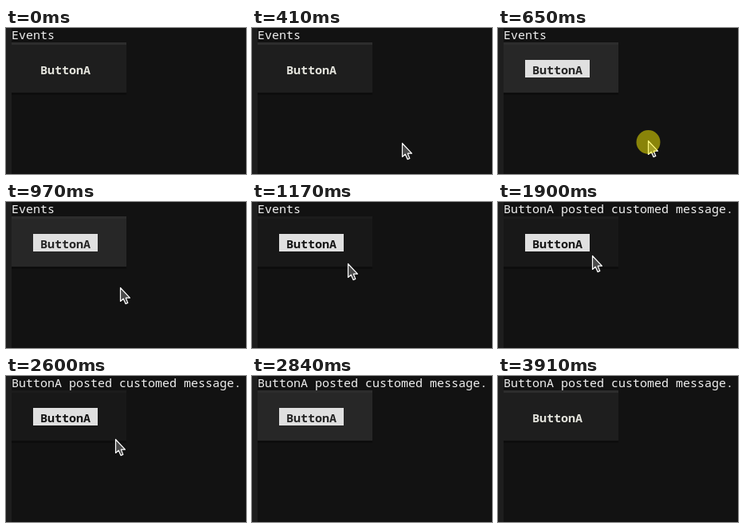
Write an HTML page that moves like this. It is 301 px wide and 183 px high and loops after 3990 ms.

```html
<!DOCTYPE html>
<html lang="en">
<head>
<meta charset="utf-8">
<title>Custom message</title>
<style>
  html, body { margin: 0; width: 100%; height: 100%; overflow: hidden; background: #121212; }
  svg { display: block; width: 301px; height: 183px; }
  text { font: 15px "Noto Sans Mono", "DejaVu Sans Mono", monospace; fill: #f0f0f0; white-space: pre; }
  rect { shape-rendering: crispEdges; }
  .edge { fill: #1e1e1e; }

  #button { --face: #1e1e1e; --top: #2d2d2d; --bottom: #0d0d0d; }
  #button.focus { --face: #272727; --top: #2d2d2d; }
  #button.hover { --face: #181818; --top: #1c1c1c; }
  #button.active { --face: #161616; --top: #101010; --bottom: #242424; }
  .face { fill: var(--face); }
  .top { fill: var(--top); }
  .bottom { fill: var(--bottom); }
  .label { fill: none; }
  #button text { font-weight: 700; fill: #e3e3dc; }
  .focus .label { fill: #e0e0e0; }
  #button.focus text { fill: #242424; }
  #button.hover text { fill: #151515; }
  .active .label { fill: #a2a2a2; }

  .arrow { fill: #4b4b4b; stroke: #fff; stroke-width: 1.2; stroke-linejoin: round; }
  #ring { fill: #fff500; fill-opacity: .5; }
</style>
</head>
<body>
<svg viewBox="0 0 301 183">
  <rect class="edge" width="7" height="183"/>
  <text id="title" x="7" y="14">Events</text>
  <g id="button">
    <rect class="face" x="7" y="18" width="144" height="66"/>
    <rect class="top" x="7" y="18" width="144" height="3"/>
    <rect class="bottom" x="7" y="81" width="144" height="3"/>
    <rect class="label" x="34" y="40" width="81" height="22"/>
    <text x="43" y="58">ButtonA</text>
  </g>
  <g id="pointer">
    <path class="arrow" d="M.5 .5V17.5L4.2 14.2L7 20.6L9.8 19.4L7.3 13.2H12.4Z"/>
    <circle id="ring" cx=".5" cy="2" r="15"/>
  </g>
</svg>
<script>
  const LOOP = 3990, TICK = 40;
  const [title, button, pointer, ring] =
    ["title", "button", "pointer", "ring"].map(id => document.getElementById(id));

  const easeOut = n => p => 1 - (1 - p) ** n;
  const easeIn = n => p => p ** n;

  // Each move advances once per tick, starting with its first step at `start`.
  const moves = [
    { start: 250, steps: 6, from: [183, 186], to: [188, 141], x: easeOut(1.5), y: easeOut(1.5) },
    { start: 810, steps: 12, from: [188, 141], to: [118, 67], x: easeOut(1.9), y: easeOut(1.14) },
    { start: 2600, steps: 7, from: [118, 67], to: [318, 188], x: easeIn(1.2), y: easeIn(1.2) }
  ];

  const within = (t, a, b) => t >= a && t < b;

  function locate(t) {
    const move = moves.findLast(m => t >= m.start);
    if (!move) return null;
    const { start, steps, from, to } = move;
    const p = Math.min(steps, Math.floor((t - start) / TICK) + 1) / steps;
    const mix = (i, ease) => Math.round(from[i] + (to[i] - from[i]) * ease(p));
    return [mix(0, move.x), mix(1, move.y)];
  }

  function draw(t) {
    const spot = locate(t);
    const over = !!spot && within(spot[0], 7, 151) && within(spot[1], 18, 84);

    pointer.style.display = spot ? "" : "none";
    if (spot) pointer.setAttribute("transform", `translate(${spot})`);
    ring.style.display = within(t, 610, 730) || within(t, 1580, 1740) ? "" : "none";

    button.classList.toggle("focus", within(t, 650, 3910));
    button.classList.toggle("hover", over);
    button.classList.toggle("active", within(t, 1700, 1900));
    title.textContent = t < 1700 ? "Events" : "ButtonA posted customed message.";
  }

  const begin = performance.now();
  function frame() {
    draw((performance.now() - begin) % LOOP);
    requestAnimationFrame(frame);
  }
  draw(0);
  requestAnimationFrame(frame);
</script>
</body>
</html>
```
